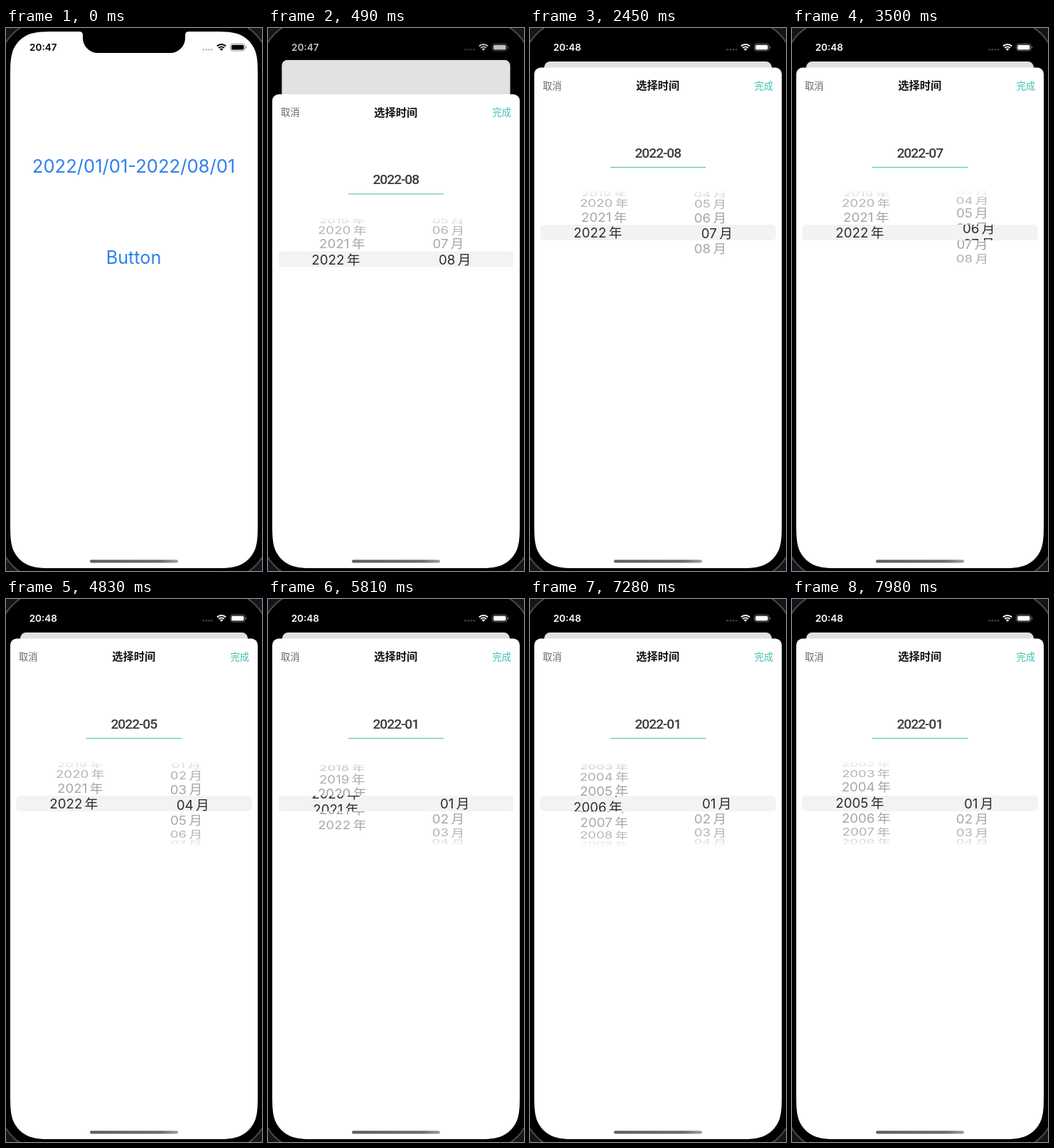
An HTML page with a canvas that plays this animation: 360 by 762 pixels, repeating every 8000 ms.

```html
<!DOCTYPE html>
<html lang="zh">
<head>
<meta charset="utf-8">
<title>选择时间</title>
<style>
html, body { margin: 0; width: 100%; height: 100%; overflow: hidden; background: #000; }
canvas { display: block; width: 360px; height: 762px; }
</style>
</head>
<body>
<canvas id="stage"></canvas>
<script>
const canvas = document.getElementById('stage');
const ctx = canvas.getContext('2d');
const W = 360, H = 762, LOOP = 8000, STEP = 70;
const dpr = window.devicePixelRatio || 1;
canvas.width = W * dpr;
canvas.height = H * dpr;

const SANS = 'Inter, "Noto Sans CJK SC", "Noto Sans CJK", sans-serif';
const CJK = '"Noto Sans CJK SC", "Noto Sans CJK", "Noto Sans CJK JP", sans-serif';
const TEAL = '#45bfb3';
const THIN_SPACE = '\u2009';
const SCREEN = { x: 6, y: 5, w: 348, h: 753 };
const SHEET_TOP = 55.5;

// Picker wheel: a cylinder seen from the front.
const WHEEL = { y: 287.3, radius: 60.5, angle: 0.37, lensTop: 276, lensBottom: 298, top: 227.5, bottom: 347 };

const MONTH_KEYS = [
  [2170, 8], [2240, 7.6], [2310, 7.1], [2380, 6.85], [2450, 6.95], [2520, 7],
  [3430, 7], [3500, 6.28], [3570, 5.1], [3640, 5.1], [3710, 5.03], [3780, 5],
  [4690, 5], [4760, 4.6], [4900, 3.2], [5110, 1.9], [5320, 1.15], [5530, 1]
];

const clamp01 = v => Math.max(0, Math.min(1, v));
const pad = n => String(n).padStart(2, '0');

function keyed(keys, t) {
  if (t <= keys[0][0]) return keys[0][1];
  for (let i = 1; i < keys.length; i++) {
    const [t0, v0] = keys[i - 1], [t1, v1] = keys[i];
    if (t <= t1) return v0 + (v1 - v0) * (t - t0) / (t1 - t0);
  }
  return keys[keys.length - 1][1];
}

function presentation(t) {
  if (t < 210) return 0;
  if (t > 770) return 1;
  const x = (t - 150) * 0.01372;
  return 1 - (1 + x) * Math.exp(-x);
}

// A flick that slows down exponentially.
const yearAt = t => t < 5810 ? 2022 : 2022 - 17.2 + 15.82 * Math.exp(-1.888 * (t - 5810) / 1000);

function chosenMonth(t) {
  if (t < 2520) return 8;
  if (t < 3780) return 7;
  return t < 5530 ? 5 : 1;
}

function roundRect(x, y, w, h, r) {
  ctx.beginPath();
  ctx.roundRect(x, y, w, h, r);
}

// Rounded rectangle whose corners ease into the straight edges.
function smoothRect(x, y, w, h, r) {
  const corner = (cx, cy, ux, uy, vx, vy) => {
    const at = (a, b) => [cx + r * (a * ux + b * vx), cy + r * (a * uy + b * vy)];
    ctx.lineTo(...at(1.529, 0));
    ctx.bezierCurveTo(...at(1.088, 0), ...at(0.868, 0), ...at(0.631, 0.075));
    ctx.bezierCurveTo(...at(0.373, 0.169), ...at(0.169, 0.373), ...at(0.075, 0.631));
    ctx.bezierCurveTo(...at(0, 0.868), ...at(0, 1.088), ...at(0, 1.529));
  };
  ctx.beginPath();
  corner(x, y, 0, 1, 1, 0);
  corner(x + w, y, -1, 0, 0, 1);
  corner(x + w, y + h, 0, -1, -1, 0);
  corner(x, y + h, 1, 0, 0, -1);
  ctx.closePath();
}

function text(str, x, y, size, color, align = 'center', weight = 400, family = SANS) {
  ctx.font = `${weight} ${size}px ${family}`;
  ctx.fillStyle = color;
  ctx.textAlign = align;
  ctx.fillText(str, x, y + size * 0.36);
}

function drawHome(p) {
  const { x, y, w, h } = SCREEN;
  const scale = 1 - 28 * p / w;
  ctx.save();
  ctx.translate(x + 14 * p, y + 42 * p);
  ctx.scale(scale, scale);
  roundRect(0, 0, w, h, p > 0 ? 9 : 0);
  ctx.clip();
  ctx.fillStyle = '#fff';
  ctx.fillRect(0, 0, w, h);
  text('2022/01/01-2022/08/01', 173.5, 189, 25.6, '#2f80ed');
  text('Button', 173.5, 317, 25.2, '#2f80ed');
  ctx.fillStyle = `rgba(0,0,0,${0.12 * p})`;
  ctx.fillRect(0, 0, w, h);
  ctx.restore();
}

function clipBand(top, bottom, draw) {
  ctx.save();
  ctx.beginPath();
  ctx.rect(SCREEN.x, top, SCREEN.w, bottom - top);
  ctx.clip();
  draw();
  ctx.restore();
}

function drawRows(column, x, color, fade) {
  const { pos, min, max, label } = column;
  const first = Math.max(min, Math.ceil(pos - 3.6));
  const last = Math.min(max, Math.floor(pos + 3.6));
  for (let n = first; n <= last; n++) {
    const theta = (n - pos) * WHEEL.angle;
    const depth = Math.cos(theta);
    if (depth < 0.22) continue;
    ctx.save();
    ctx.translate(x, WHEEL.y + WHEEL.radius * Math.sin(theta));
    ctx.scale(1, depth);
    ctx.globalAlpha = fade ? 0.43 * Math.pow(depth, 0.7) : 1;
    text(label(n), 0, 0, 18.7, color);
    ctx.restore();
  }
}

function fadeEdge(edge, inner) {
  const g = ctx.createLinearGradient(0, edge, 0, inner);
  g.addColorStop(0, 'rgba(255,255,255,.85)');
  g.addColorStop(1, 'rgba(255,255,255,0)');
  ctx.fillStyle = g;
  ctx.fillRect(SCREEN.x, Math.min(edge, inner), SCREEN.w, Math.abs(inner - edge));
}

function drawPicker(t) {
  const years = { pos: yearAt(t), min: 1990, max: 2022, label: n => n + THIN_SPACE + '年' };
  const months = { pos: keyed(MONTH_KEYS, t), min: 1, max: 8, label: n => pad(n) + THIN_SPACE + '月' };
  const { top, bottom, lensTop, lensBottom } = WHEEL;
  const outer = () => {
    drawRows(years, 104.2, '#222', true);
    drawRows(months, 253.5, '#222', true);
  };
  clipBand(top, lensTop, outer);
  clipBand(lensBottom, bottom, outer);
  fadeEdge(top, top + 11);
  fadeEdge(bottom, bottom - 11);

  roundRect(14, lensTop, 332, lensBottom - lensTop, 6);
  ctx.fillStyle = '#f3f3f3';
  ctx.fill();
  clipBand(lensTop, lensBottom, () => {
    drawRows(years, 95.4, '#2c2c2c', false);
    drawRows(months, 262.8, '#2c2c2c', false);
  });
}

function drawSheet(t, p) {
  ctx.save();
  ctx.translate(0, (1 - p) * (SCREEN.y + SCREEN.h - SHEET_TOP));
  roundRect(SCREEN.x, SHEET_TOP, SCREEN.w, 760, 9);
  ctx.fillStyle = '#fff';
  ctx.fill();
  text('取消', 18, 80.8, 13.3, '#666', 'left', 400, CJK);
  text('选择时间', 179.7, 80.8, 15.2, '#111', 'center', 700, CJK);
  text('完成', 342, 80.8, 13.3, TEAL, 'right', 400, CJK);
  ctx.letterSpacing = '-1px';
  text('2022-' + pad(chosenMonth(t)), 179.8, 175, 19.2, '#3a3a3a', 'center', 500, 'Roboto, sans-serif');
  ctx.letterSpacing = '0px';
  ctx.fillStyle = TEAL;
  ctx.fillRect(113, 195, 134, 1);
  drawPicker(t);
  ctx.restore();
}

function drawStatus(t) {
  const light = Math.round(255 * clamp01((t - 150) / 450));
  const ink = `rgb(${light},${light},${light})`;
  text(t < 1330 ? '20:47' : '20:48', 52.3, 27.3, 13.5, ink, 'center', 600);

  ctx.fillStyle = ctx.strokeStyle = ink;
  ctx.globalAlpha = 0.25;
  for (let i = 0; i < 4; i++) {
    ctx.beginPath();
    ctx.arc(277.6 + i * 4.1, 30.3, 1.4, 0, 7);
    ctx.fill();
  }
  ctx.globalAlpha = 1;

  const up = -Math.PI / 2, spread = 0.75;
  ctx.lineWidth = 2;
  for (const r of [5.6, 9]) {
    ctx.beginPath();
    ctx.arc(303, 32, r, up - spread, up + spread);
    ctx.stroke();
  }
  ctx.beginPath();
  ctx.moveTo(303, 32);
  ctx.arc(303, 32, 3.4, up - spread, up + spread);
  ctx.fill();

  ctx.globalAlpha = 0.4;
  ctx.lineWidth = 1;
  roundRect(315.5, 22.2, 20.5, 9.8, 3);
  ctx.stroke();
  roundRect(336.8, 25.4, 1.3, 3.4, 1);
  ctx.fill();
  ctx.globalAlpha = 1;
  roundRect(317, 23.7, 17.5, 6.8, 1.8);
  ctx.fill();
}

function drawNotch() {
  ctx.beginPath();
  ctx.moveTo(103, 4);
  ctx.lineTo(103, 5);
  ctx.quadraticCurveTo(108, 5, 108, 10);
  ctx.arcTo(108, 35, 129, 35, 21);
  ctx.arcTo(252, 35, 252, 14, 21);
  ctx.lineTo(252, 10);
  ctx.quadraticCurveTo(252, 5, 257, 5);
  ctx.lineTo(257, 4);
  ctx.fillStyle = '#000';
  ctx.fill();
}

function drawHomeBar() {
  const g = ctx.createLinearGradient(118, 0, 242, 0);
  g.addColorStop(0, '#606060');
  g.addColorStop(0.8, '#6c6c6c');
  g.addColorStop(1, '#a0a0a0');
  roundRect(118, 746.3, 124, 4.2, 2.1);
  ctx.fillStyle = g;
  ctx.fill();
}

function drawBezel() {
  ctx.fillStyle = '#14141c';
  ctx.fillRect(0, 0, W, H);
  roundRect(-10, -11, 380, 785, 66);
  ctx.fillStyle = '#000';
  ctx.fill();
  ctx.strokeStyle = '#484848';
  ctx.lineWidth = 2;
  ctx.stroke();
}

function render(t) {
  const p = presentation(t);
  ctx.setTransform(dpr, 0, 0, dpr, 0, 0);
  drawBezel();
  ctx.save();
  smoothRect(SCREEN.x, SCREEN.y, SCREEN.w, SCREEN.h, 44);
  ctx.clip();
  ctx.fillStyle = '#000';
  ctx.fillRect(0, 0, W, H);
  drawHome(p);
  if (p > 0) drawSheet(t, p);
  ctx.restore();
  drawNotch();
  drawStatus(t);
  drawHomeBar();
}

const start = performance.now();
function tick() {
  const t = (performance.now() - start) % LOOP;
  render(Math.floor(t / STEP) * STEP);
  requestAnimationFrame(tick);
}
tick();
</script>
</body>
</html>
```
